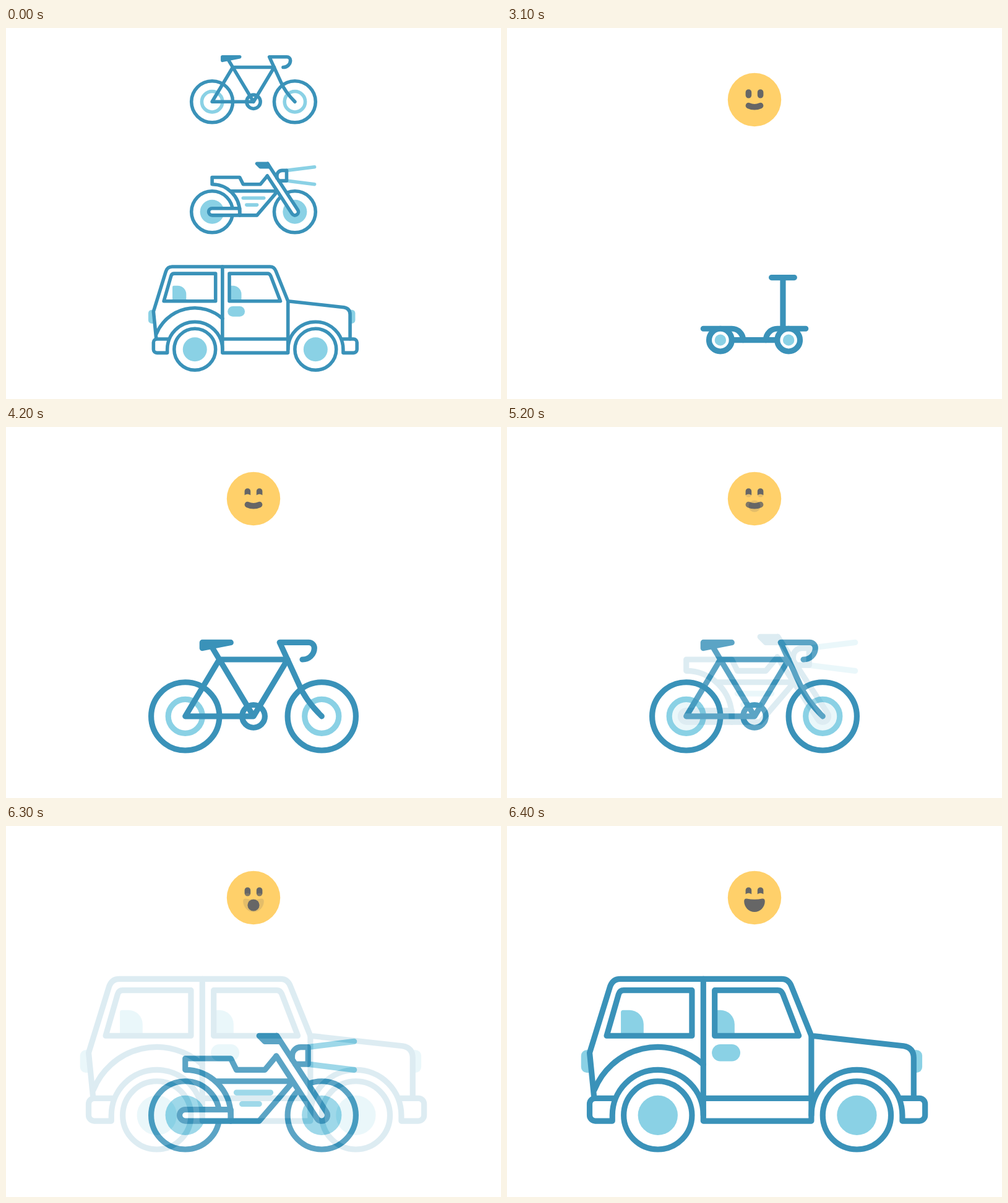
Write an HTML page that moves like this. It is 800 by 600 pixels and loops after 8400 ms.

```html
<!DOCTYPE html>
<html lang="en">
<head>
<meta charset="utf-8">
<title>Rides</title>
<style>
  html, body { margin: 0; width: 100%; height: 100%; overflow: hidden; background: #fff; }
  svg { display: block; width: 100vw; height: 100vh; }
  .ride { fill: none; stroke: #3a92b9; stroke-width: 1; stroke-linecap: round; stroke-linejoin: round; }
  .solid { fill: #3a92b9; }
  .white { fill: #fff; }
  .tint { fill: #8ad1e5; stroke: none; }
  .glow { stroke: #8ad1e5; }
  .skin { fill: #ffd06a; }
  .ink { fill: #666; }
  .lip { fill: none; stroke: #666; stroke-width: 1; stroke-linecap: round; }
</style>
</head>
<body>
<svg id="stage" viewBox="0 0 800 600"></svg>
<script>
const LOOP = 8400;
const STEP = 20;
const STEPS = 6;
const FADES = [3000, 4100, 5200, 6300];
const SMALL = 340 / 61;
const LARGE = 340 / 37;

const path = (d, cls = '') => `<path d="${d}" class="${cls}"/>`;
const circle = (x, y, r, cls = '') => `<circle cx="${x}" cy="${y}" r="${r}" class="${cls}"/>`;
const pair = (left, right, y, r, cls) => circle(left, y, r, cls) + circle(right, y, r, cls);

// Rides: one unit is the line width, x = 0 is the middle, y = 0 is the ground.
const skateboard =
  path('M-7.75 -4H7.75V-2.8H-7.75Z', 'tint') +
  path('M-8 -3.5A1 1 0 0 0 -7 -2.5H7A1 1 0 0 0 8 -3.5') +
  pair(-5, 5, -1.5, 1, 'white');

const scooter =
  path('M-6 -2.5H6') +
  path('M-9 -4.5H-4A2 2 0 0 1 -2 -2.5M9 -4.5H4A2 2 0 0 0 2 -2.5') +
  path('M5 -4.5V-13.5M3 -13.5H7') +
  pair(-6, 6, -2.5, 2, 'white') +
  pair(-6, 6, -2.5, 1, 'tint');

const bicycle =
  pair(-12, 12, -6.5, 3, 'glow') +
  pair(-12, 12, -6.5, 6) +
  circle(0, -6.5, 2) +
  path('M0 -6.5H-12L-6 -16.5H6L0 -6.5L-7.5 -19') +
  path('M12 -6.5C10.6 -7.9 8.9 -9.9 8 -12.1L4.6 -19.5H9.7A1 1 0 0 1 10.7 -18.5A2.05 2 0 0 1 8.6 -16.5') +
  path('M-9 -19.5H-4L-9 -18.5Z', 'solid');

const motorcycle =
  pair(-12, 12, -6.5, 3.5, 'tint') +
  pair(-12, 12, -6.5, 6) +
  path('M9.6 -18.5L17.7 -19.5M9.6 -15.5L17.7 -14.5M-3 -10.5H3M-2 -8.5H1', 'glow') +
  path('M-4 -7.5H-12A1 1 0 0 0 -12 -5.5H-4Z', 'white') +
  path('M-4 -5.5H1L7 -12.5H-6.4') +
  path('M4 -16.9L2 -14.5H-3L-4 -16.5H-12V-14.5A8 8 0 0 1 -4 -6.5V-5.5') +
  path('M4.1 -20.5L12.84 -7.05A1 1 0 0 1 11.16 -5.95L4 -16.95', 'white') +
  path('M7.35 -15.5H9.6V-18.5H8.3A1.5 1.5 0 0 0 6.8 -17V-16.3') +
  path('M1 -20.5H4.1L4.6 -19.5H2Z', 'solid');

const car =
  path('M-29 -18H-29.5A1 1 0 0 0 -30.5 -17V-15A1 1 0 0 0 -29.5 -14H-28.6L-29 -17.5Z', 'tint') +
  path('M28 -18H28.5A1 1 0 0 1 29.5 -17V-15A1 1 0 0 1 28.5 -14H28Z', 'tint') +
  path('M-23.5 -20.5V-24.6Q-23.5 -25 -23.1 -25H-22A2.5 2.5 0 0 1 -19.5 -22.5V-20.5Z', 'tint') +
  path('M-7 -20.5V-25H-6A2.5 2.5 0 0 1 -3.5 -22.5V-20.5Z', 'tint') +
  '<rect x="-7.5" y="-19" width="5" height="3" rx="1.5" class="tint"/>' +
  path('M-28.2 -9.5L-29 -17.5L-25.45 -29Q-25 -30.5 -23.6 -30.5H4.8Q6 -30.5 6.5 -29.2L10 -20.5L26.2 -18.7Q28 -18.4 28 -16.6V-9.5') +
  path('M-26 -20.5L-23.9 -27.8Q-23.7 -28.5 -23 -28.5H-11V-20.5Z') +
  path('M-7 -28.5H4.1Q4.7 -28.5 5 -27.8L7.8 -20.5H-7Z') +
  path('M-9 -30.5V-5.5H10V-20.5M-9 -9.5H10') +
  path('M-28.15 -11A12 12 0 0 1 -9 -15.44') +
  path('M-9 -6.5A8 8 0 0 0 -25 -6.5V-5.5H-28A1 1 0 0 1 -29 -6.5V-8.5A1 1 0 0 1 -28 -9.5H-24.42') +
  path('M10 -6.5A8 8 0 0 1 26 -6.5V-5.5H29A1 1 0 0 0 30 -6.5V-8.5A1 1 0 0 0 29 -9.5H25.42') +
  pair(-17, 18, -6.5, 6) +
  pair(-17, 18, -6.5, 3.5, 'tint');

// Faces: one unit is the width of an eye, the origin is the middle of the head.
const openEyes = path('M-1 -1.25V-.75M1 -1.25V-.75', 'lip');
const happyEyes = [-1, 1].map(x =>
  path(`M${x - .5} -.6V-1.25a.5 .5 0 0 1 1 0V-.6q-.5 -.35 -1 0Z`, 'ink')).join('');
const flat = path('M-1 1H1', 'lip');
const smile = path('M-1 1Q0 1.45 1 1', 'lip');
const gasp = circle(0, 1.25, 1, 'ink');
const laugh = path('M-1.75 .6Q-1.75 .1 -1.3 .15Q0 .4 1.3 .15Q1.75 .1 1.75 .6A1.75 1.8 0 0 1 -1.75 .6Z', 'ink');

const place = (ride, ground, unit) =>
  `<g class="ride" transform="translate(400 ${ground}) scale(${unit})">${ride}</g>`;
const face = (eyes, mouth) =>
  `<g transform="translate(400 116) scale(9.6)">${circle(0, 0, 4.5, 'skin')}${eyes}${mouth}</g>`;
const mood = (ride, eyes, mouth) => place(ride, 527.6, LARGE) + face(eyes, mouth);

const scenes = [
  place(bicycle, 155.5, SMALL) + place(motorcycle, 333.5, SMALL) + place(car, 556, SMALL),
  mood(skateboard, openEyes, flat),
  mood(scooter, openEyes, smile),
  mood(bicycle, happyEyes, smile),
  mood(motorcycle, openEyes, gasp),
  mood(car, happyEyes, laugh)
];

const stage = document.getElementById('stage');
stage.innerHTML = scenes.map(s => `<g><rect width="800" height="600" class="white"/>${s}</g>`).join('');
const layers = [...stage.children];

function opacityAt(index, t) {
  if (index === 0) return 1;
  if (index === 1) return t >= 2000 ? 1 : 0;
  const step = Math.floor((t - FADES[index - 2]) / STEP) + 1;
  return Math.min(Math.max(step / STEPS, 0), 1);
}

function draw(t) {
  layers.forEach((layer, i) => {
    const opacity = opacityAt(i, t);
    layer.setAttribute('opacity', opacity);
    layer.setAttribute('visibility', opacity ? 'visible' : 'hidden');
  });
}

function tick() {
  draw(performance.now() % LOOP);
  requestAnimationFrame(tick);
}
tick();
</script>
</body>
</html>
```
